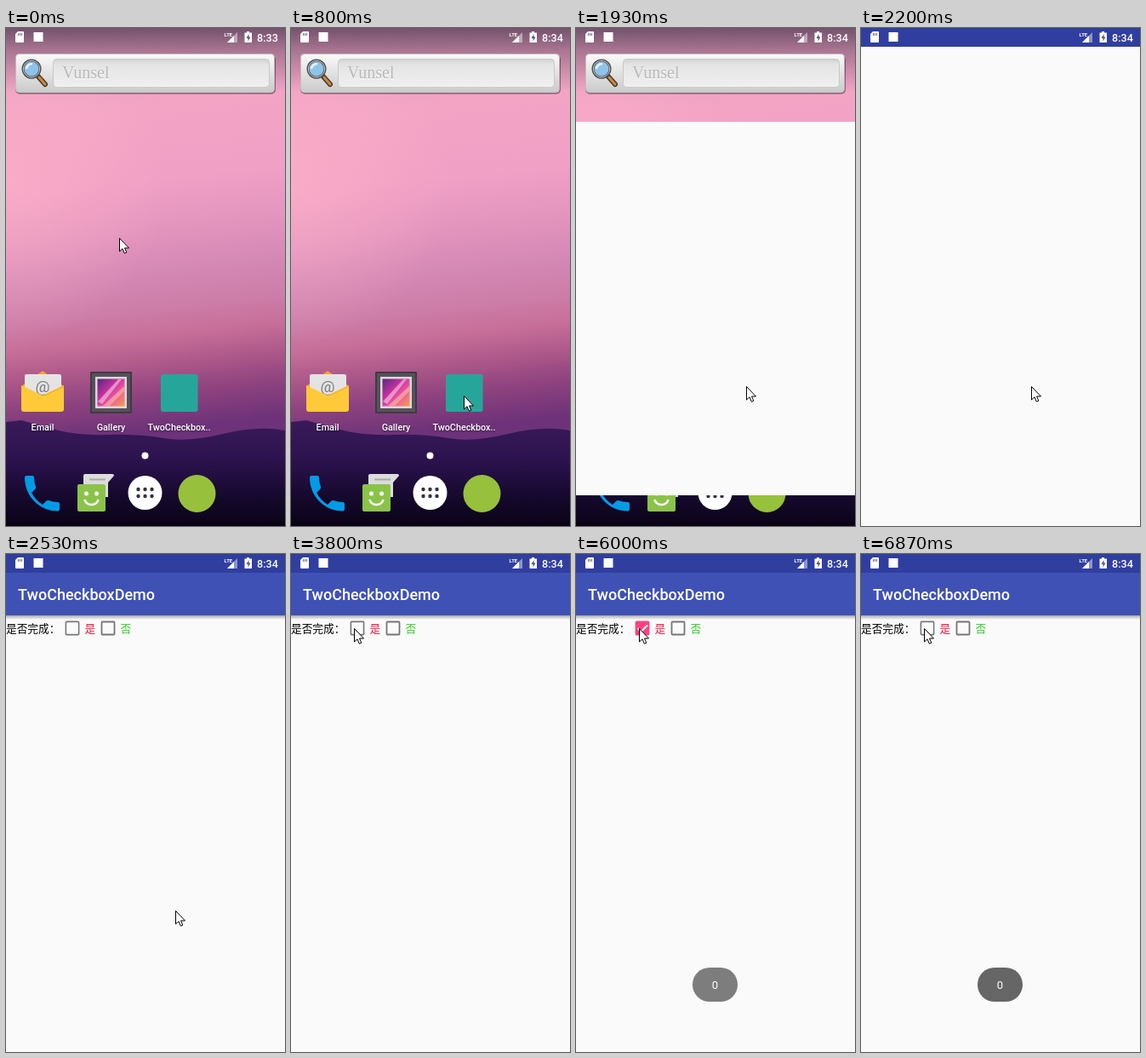
Recreate the animation shown at these times as an HTML page. Size 328 by 584 pixels, loop 8 s.

```html
<!DOCTYPE html>
<html lang="zh-CN">
<head>
<meta charset="utf-8">
<title>TwoCheckboxDemo</title>
<style>
  html, body { margin: 0; width: 100%; height: 100%; overflow: hidden; background: #fafafa; }
  svg { display: block; width: 100%; height: 100%; }
  text { font-family: Roboto, sans-serif; }
  .label { font-size: 10.8px; font-weight: 500; fill: #fff; text-anchor: middle; filter: drop-shadow(0 1px 1px #0008); }
  .hint { font: 20px "Liberation Serif", serif; fill: #b8b8b8; }
  .title { font-size: 18px; font-weight: 500; fill: #fff; }
  .cjk { font: 12.7px "Noto Sans CJK SC", "Noto Sans CJK", sans-serif; }
  .clock { font-size: 12.6px; font-weight: 500; fill: #fff; }
</style>
</head>
<body>
<svg viewBox="0 0 328 584" preserveAspectRatio="none">
  <defs>
    <linearGradient id="sky" gradientUnits="userSpaceOnUse" x1="138" y1="0" x2="190" y2="470">
      <stop offset="0" stop-color="#e99fc0"/>
      <stop offset=".2" stop-color="#f3a4c5"/>
      <stop offset=".38" stop-color="#f0a0c5"/>
      <stop offset=".5" stop-color="#e495be"/>
      <stop offset=".6" stop-color="#d589b5"/>
      <stop offset=".7" stop-color="#cc7da8"/>
      <stop offset=".77" stop-color="#c66e98"/>
      <stop offset=".84" stop-color="#ad588a"/>
      <stop offset=".91" stop-color="#8f437f"/>
      <stop offset="1" stop-color="#6d3279"/>
    </linearGradient>
    <radialGradient id="glow" gradientUnits="userSpaceOnUse" cx="0" cy="180" r="190">
      <stop offset="0" stop-color="#ffb2c8" stop-opacity=".6"/>
      <stop offset="1" stop-color="#ffb2c8" stop-opacity="0"/>
    </radialGradient>
    <linearGradient id="scrim" x2="0" y2="1">
      <stop offset="0" stop-color="#2b2338" stop-opacity=".62"/>
      <stop offset=".35" stop-color="#2b2338" stop-opacity=".35"/>
      <stop offset="1" stop-color="#2b2338" stop-opacity="0"/>
    </linearGradient>
    <linearGradient id="hills" x2="0" y2="1">
      <stop offset="0" stop-color="#3a1a5a"/>
      <stop offset=".35" stop-color="#2d1350"/>
      <stop offset=".7" stop-color="#170930"/>
      <stop offset="1" stop-color="#0a0315"/>
    </linearGradient>
    <linearGradient id="bar" x2="0" y2="1">
      <stop offset="0" stop-color="#fafafa"/>
      <stop offset="1" stop-color="#cacaca"/>
    </linearGradient>
    <linearGradient id="field" x2="0" y2="1">
      <stop offset="0" stop-color="#d2d2d2"/>
      <stop offset=".2" stop-color="#e4e4e4"/>
      <stop offset="1" stop-color="#f0f0f0"/>
    </linearGradient>
    <linearGradient id="picture" x2="1" y2="1">
      <stop offset="0" stop-color="#5c2580"/>
      <stop offset=".4" stop-color="#c632a0"/>
      <stop offset=".65" stop-color="#ee5aa0"/>
      <stop offset="1" stop-color="#f2a046"/>
    </linearGradient>
    <linearGradient id="shade" x2="0" y2="1">
      <stop offset="0" stop-opacity=".32"/>
      <stop offset="1" stop-opacity="0"/>
    </linearGradient>
    <clipPath id="reveal"><rect id="revealBox"/></clipPath>
    <clipPath id="below"><rect y="72" width="328" height="512"/></clipPath>
  </defs>

  <g id="home">
    <rect width="328" height="584" fill="url(#sky)"/>
    <rect width="328" height="400" fill="url(#glow)"/>
    <rect width="328" height="75" fill="url(#scrim)"/>
    <path d="M0 462L18 460Q40 466 62 472T120 477T185 481T255 476T328 472V584H0Z" fill="url(#hills)"/>

    <!-- search bar -->
    <rect x="11" y="32" width="306" height="45.500" rx="5" fill="#0006"/>
    <rect x="11.500" y="30.500" width="304" height="45" rx="4" fill="url(#bar)" stroke="#c2bcc2"/>
    <rect x="55.500" y="36.500" width="254" height="33" rx="4" fill="url(#field)" stroke="#c8c8c8"/>
    <path d="M38 57L46 66" stroke="#4a3a2c" stroke-width="6" stroke-linecap="round"/>
    <path d="M39 58L46 66" stroke="#c98a3c" stroke-width="3" stroke-linecap="round"/>
    <circle cx="30" cy="48" r="10" fill="#8fc3ea" stroke="#4d4d4d" stroke-width="3"/>
    <circle cx="30" cy="48" r="9.700" fill="none" stroke="#c9c9c9"/>
    <path d="M24 48Q25 42 31 42" stroke="#e6f4ff" stroke-width="2.500" fill="none"/>
    <text class="hint" x="66" y="60" style="fill:#fff">Vunsel</text>
    <text class="hint" x="66" y="59">Vunsel</text>

    <!-- shortcuts -->
    <path d="M18 420L43 402L68 420V430H18Z" fill="#f5a623"/>
    <path d="M22 408Q22 406 24 406H63Q65 406 65 408V440H22Z" fill="#e4e4e4"/>
    <text x="43" y="427" font-size="19" text-anchor="middle" fill="#7d7d7d">@</text>
    <path d="M18 419L43 431L68 419V447Q68 450 65 450H21Q18 450 18 447Z" fill="#ffca3a"/>
    <path d="M43 431L68 419V421L45 432Z" fill="#f7b52c"/>
    <text class="label" x="43" y="471.500">Email</text>

    <rect x="99" y="403" width="49" height="49" rx="1" fill="#3f3b43"/>
    <rect x="101" y="405" width="45" height="45" fill="#56515a"/>
    <rect x="105" y="409" width="37" height="37" fill="#dcd8dc"/>
    <rect x="107.500" y="411.500" width="32" height="32" fill="url(#picture)"/>
    <path d="M108 438L132 412H136L113 441Z" fill="#ffd9ec" opacity=".55"/>
    <path d="M114 443L139 420V426L122 443Z" fill="#ffe0a0" opacity=".45"/>
    <text class="label" x="123.500" y="471.500">Gallery</text>

    <rect x="182" y="406" width="43.500" height="44" rx="2.500" fill="#26a69a"/>
    <g id="pressed">
      <rect x="176" y="401" width="55" height="54" fill="#cfabc0"/>
      <rect x="182" y="406" width="43.500" height="44" rx="2.500" fill="#a3c9e0"/>
    </g>
    <text class="label" x="203.500" y="471.500">TwoCheckbox..</text>

    <!-- dock -->
    <circle cx="163.500" cy="501.500" r="4" fill="#fff"/>
    <path d="M24 525H31Q33 525 33 527Q33 533 35 538Q35.500 540 34 541L30 545Q35 554 43 559L47 555Q48.500 553.500 50 554Q55 556 61 556Q63 556 63 558V564Q63 566.500 61 566.500C39 566.500 22 549 22 527Q22 525 24 525Z" fill="#039be5"/>
    <path d="M93 523H125Q127 523 127 525L120 533V550H93Q91 550 91 548V525Q91 523 93 523Z" fill="#dcdcdc"/>
    <path d="M98 529.500H117" stroke="#a9a9a9" stroke-width="2"/>
    <path d="M86 535H115Q117 535 117 537V565Q117 567 115 567H86Q84 567 84 565V537Q84 535 86 535Z" fill="#8bc34a"/>
    <circle cx="94.500" cy="546" r="2.500" fill="#fff"/>
    <circle cx="106.500" cy="546" r="2.500" fill="#fff"/>
    <path d="M92.500 553Q94 559 100.500 559T108.500 553" fill="none" stroke="#fff" stroke-width="2.600"/>
    <circle cx="163.500" cy="545" r="20" fill="#fff"/>
    <path d="M155.500 541h.01m8 0h.01m8 0h.01M155.500 549h.01m8 0h.01m8 0h.01" stroke="#37303e" stroke-width="4.400" stroke-linecap="round"/>
    <circle cx="224.500" cy="546" r="22" fill="#97c03d"/>
  </g>

  <g id="app" clip-path="url(#reveal)">
    <rect width="328" height="584" fill="#fafafa"/>
    <rect width="328" height="22" fill="#303f9f"/>
    <g id="content">
      <rect y="72" width="328" height="5" fill="url(#shade)"/>
      <rect y="22" width="328" height="50" fill="#3f51b5"/>
      <text class="title" x="14" y="54">TwoCheckboxDemo</text>
      <text class="cjk" x="0" y="91.500">是否完成：</text>
      <circle id="ripple" cx="78" cy="87" clip-path="url(#below)"/>
      <rect id="frame" x="70.500" y="79.500" width="15" height="15" rx="1" stroke-width="1.800"/>
      <rect id="hole" fill="#fafafa"/>
      <path id="tick" d="M72.500 87L76.500 91L84 83.500" pathLength="1" stroke-dasharray="1 2" fill="none" stroke="#fff" stroke-width="2"/>
      <text class="cjk" x="92.500" y="91.500" fill="#f2183f">是</text>
      <rect x="112.500" y="79.500" width="15" height="15" rx="1" fill="none" stroke="#757575" stroke-width="1.800"/>
      <text class="cjk" x="134.500" y="91.500" fill="#35d02a">否</text>
    </g>
    <g id="toast">
      <rect x="137" y="485" width="53" height="40" rx="20" fill="#666"/>
      <text x="163.500" y="510" font-size="13" text-anchor="middle" fill="#fff">0</text>
    </g>
  </g>

  <!-- status icons -->
  <path d="M14 4H20Q21 4 21 5V16Q21 17 20 17H12Q11 17 11 16V7Z" fill="#fff"/>
  <path d="M14.500 6v3m2-3v3m2-3v3" stroke="#6b6580"/>
  <rect x="32.500" y="5" width="11" height="11" fill="#fff"/>
  <text x="256.500" y="9.500" font-size="6" font-weight="700" fill="#fff">LTE</text>
  <path d="M272 5V17H260Z" fill="#fff" opacity=".45"/>
  <path d="M268 9V17H260Z" fill="#fff"/>
  <path d="M283 4H286V5.500H289V17H280.500V5.500H283Z" fill="#fff"/>
  <path d="M285.500 7L282.500 12H284.500V15.500L287.500 10.500H285.500Z" fill="#5a5478"/>
  <text id="clock" class="clock" x="295" y="15.500"></text>

  <path id="cursor" d="M.5 .5V16L4 12.800L6.300 18.200L8.800 17.200L6.500 12H11.500Z" fill="#fff" stroke="#000"/>
</svg>
<script>
const LOOP = 8000, FPS = 15;
const $ = id => document.getElementById(id);
const clamp = x => Math.min(1, Math.max(0, x));
const span = (t, from, to) => clamp((t - from) / (to - from));
const smooth = x => x * x * (3 - 2 * x);
const easeOut = x => 1 - (1 - x) ** 2;
const mix = (a, b, p) => a + (b - a) * p;
const set = (id, attrs) => {
  for (const key in attrs) $(id).setAttribute(key, attrs[key]);
};

// time, x, y of the pointer tip
const path = [
  [340, 133, 246], [470, 131, 264], [800, 203, 431], [930, 201, 420],
  [1870, 201, 420], [1930, 200, 420], [2400, 200, 420], [2530, 199, 418],
  [2670, 199, 418], [3200, 68, 91], [3330, 74, 87]
];

function pointer(t) {
  const i = path.findIndex(p => p[0] > t);
  if (i === 0) return path[0].slice(1);
  if (i < 0) return path.at(-1).slice(1);
  const [t0, x0, y0] = path[i - 1], [t1, x1, y1] = path[i];
  const p = smooth(span(t, t0, t1));
  return [mix(x0, x1, p), mix(y0, y1, p)];
}

function drawWindow(t) {
  const p = smooth(easeOut(span(t, 1800, 2123)));
  const wide = clamp(p * 1.4);
  const left = mix(176, 0, wide), right = mix(231, 328, wide);
  const top = Math.floor(mix(401, 0, p)), bottom = Math.floor(mix(455, 584, p));
  set("app", { visibility: p > 0 ? "visible" : "hidden" });
  set("revealBox", { x: left, y: top, width: right - left, height: bottom - top });
  set("content", { opacity: span(t, 2200, 2400) });
  set("pressed", { opacity: t >= 1795 ? 1 : 0 });
}

function drawCheckbox(t) {
  const p = t < 5000 ? span(t, 3900, 4330) : 1 - span(t, 6400, 6860);
  const fill = smooth(clamp(p * 2)), size = 13.2 * (1 - fill);
  const color = p > 0 ? "#ff4081" : "#757575";
  set("frame", { stroke: color, fill: p > 0 ? color : "none" });
  set("hole", { x: 78 - size / 2, y: 87 - size / 2, width: size, height: size });
  const tick = clamp(p * 2 - 1);
  set("tick", { "stroke-dashoffset": 1 - tick, opacity: tick > 0 ? 1 : 0 });
}

function drawRipple(t) {
  const [start, radius, color] = t < 5000 ? [3735, 17, "#757575"] : [6270, 15, "#ff4081"];
  const fade = 1 - span(t, start + 260, start + 530);
  set("ripple", { r: radius * easeOut(span(t, start, start + 260)), fill: color, opacity: 0.26 * fade });
}

function toastAlpha(t) {
  if (t < 5995) return easeOut(span(t, 3930, 4400));
  if (t < 6300) return 1 - span(t, 5800, 6300) ** 2;
  return easeOut(span(t, 6330, 6800));
}

function draw(t) {
  drawWindow(t);
  drawCheckbox(t);
  drawRipple(t);
  set("toast", { opacity: toastAlpha(t) });
  set("cursor", { transform: `translate(${pointer(t).map(Math.round)})` });
  $("clock").textContent = t < 660 ? "8:33" : "8:34";
}

// the picture advances in whole steps of 1/FPS s
const begin = performance.now();
function tick() {
  const t = (performance.now() - begin) % LOOP;
  draw(Math.floor((t + 4) * FPS / 1000) * 1000 / FPS);
  requestAnimationFrame(tick);
}
tick();
</script>
</body>
</html>
```
